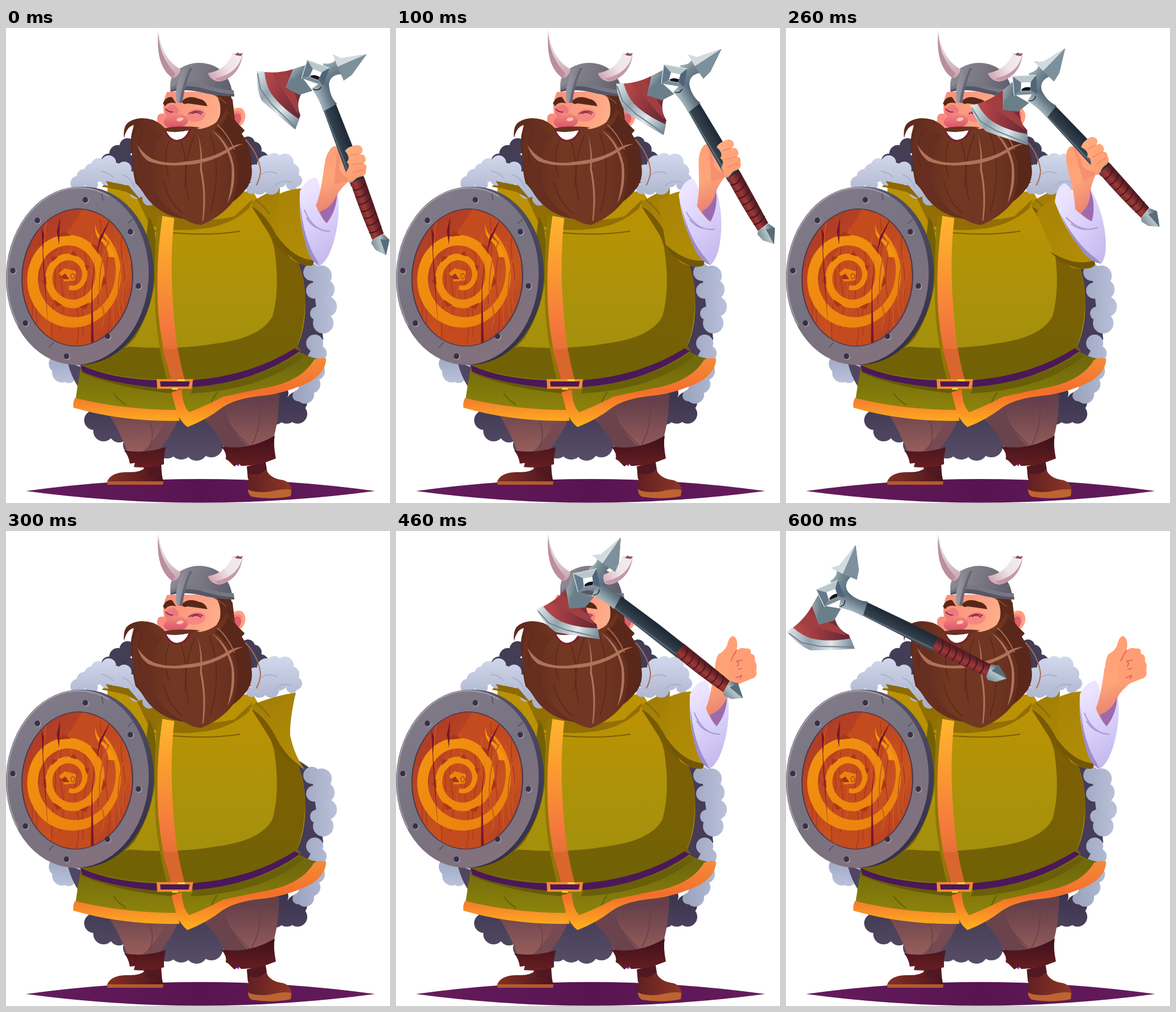
Recreate the animation shown at these times as an HTML page with a canvas. Size 673 by 832 pixels, loop 700 ms.

```html
<!DOCTYPE html>
<html lang="en">
<head>
<meta charset="utf-8">
<title>Axe throw</title>
<style>
html, body { margin: 0; width: 100%; height: 100%; overflow: hidden; background: #fff; }
canvas { display: block; width: 673px; height: 832px; }
</style>
</head>
<body>
<canvas id="stage" width="673" height="832"></canvas>
<script>
const ctx = document.getElementById('stage').getContext('2d');
const TAU = Math.PI * 2;
const STEP = 100;

// axe: centre x, y and turn in degrees; arm: turn about the elbow
const poses = [
  { axe: [649, 222, 0], arm: 0, grip: true },
  { axe: [616.5, 207.5, -9.6], arm: -9.5, grip: true },
  { axe: [572, 192, -22.4], arm: -22.4, grip: true },
  {},
  { axe: [501, 152, -31.8], arm: 0 },
  { axe: [353, 126, -43.2], arm: 0 },
  { axe: [254.5, 141.5, -43], arm: 0 }
];

function grad(x0, y0, x1, y1, ...colors) {
  const g = ctx.createLinearGradient(x0, y0, x1, y1);
  colors.forEach((c, i) => g.addColorStop(i / (colors.length - 1), c));
  return g;
}
function fill(d, color) {
  ctx.fillStyle = color;
  ctx.fill(new Path2D(d));
}
function line(d, color, width = 2) {
  ctx.strokeStyle = color;
  ctx.lineWidth = width;
  ctx.lineCap = 'round';
  ctx.stroke(new Path2D(d));
}
function oval(x, y, rx, ry, color, turn = 0) {
  ctx.fillStyle = color;
  ctx.beginPath();
  ctx.ellipse(x, y, rx, ry, turn, 0, TAU);
  ctx.fill();
}
// tufts given as x, y, radius; the space between their centres is filled too
function fur(color, ...n) {
  ctx.fillStyle = color;
  ctx.beginPath();
  for (let i = 0; i < n.length; i += 3) ctx.lineTo(n[i], n[i + 1]);
  ctx.fill();
  for (let i = 0; i < n.length; i += 3) oval(n[i], n[i + 1], n[i + 2], n[i + 2], color);
}

function drawCape() {
  fill('M35 811Q340 769 647 811Q340 852 35 811Z', grad(35, 0, 647, 0, '#651c5c', '#581451', '#651c5c'));
  const dark = grad(0, 640, 0, 757, '#3d3550', '#574d66');
  fur(dark, 165, 670, 20, 154, 687, 17, 171, 706, 18, 198, 709, 17, 222, 730, 17, 250, 728, 22,
    282, 733, 21, 307, 737, 19, 334, 739, 19, 360, 732, 20, 390, 715, 20, 470, 675, 20, 492, 675, 18,
    511, 676, 17, 510, 655, 18, 480, 640, 15);
  fill('M510 400L540 420L556 545L530 600L500 590Z', '#463c58');
  const light = grad(500, 0, 580, 0, '#98a0bb', '#bac1da');
  fur(light, 536, 428, 15, 553, 434, 18, 558, 458, 18, 562, 488, 18, 556, 517, 18, 545, 500, 12, 540, 460, 14);
  fur(light, 541, 552, 15, 548, 570, 14, 543, 601, 16, 535, 624, 16, 524, 642, 16, 512, 644, 10, 515, 600, 14);
  fur(grad(0, 585, 0, 625, '#a4adc9', '#bcc4dc'), 92, 588, 17, 98, 604, 17, 112, 600, 17, 110, 610, 12, 120, 590, 12);
  fill('M108 585L133 595L126 628Q114 610 108 585Z', '#504661');
}

function drawLegs() {
  const cloth = grad(0, 655, 0, 742, '#65404a', '#975e5b');
  fill('M180 676L186 660L308 665L302 684Q286 722 263 742L213 742Q200 708 180 676Z', cloth);
  fill('M280 685L302 684Q286 722 263 742L240 742Q270 712 280 685Z', '#764a50');
  line('M252 690Q261 710 252 735', '#65404a', 1.5);
  fill('M350 688L345 660L440 625L479 642Q478 690 467 725L385 741Q378 715 350 688Z', cloth);
  fill('M350 688L385 660Q384 700 430 738L385 741Q378 715 350 688Z', '#6b434c');
  line('M445 660Q448 700 430 731M381 680Q400 708 427 732', '#65404a', 1.5);
  const boot = grad(0, 715, 0, 775, '#3e101b', '#6b2022');
  fill('M243 760L272 764L274 795L238 795Z', '#501820');
  fill('M177 795Q184 777 215 778Q235 779 246 769L247 781Q260 786 272 778L276 796Z', grad(180, 0, 275, 0, '#823024', '#4b141f'));
  fill('M177 794L276 794L275 800L178 800Z', '#b35b31');
  fill('M207 740Q245 746 280 734Q276 752 277 764Q253 772 224 769L226 762L217 763Q215 749 207 740Z', boot);
  fill('M422 768L455 760L459 786L424 790Z', '#501820');
  fill('M427 780Q443 786 456 773Q462 789 486 792Q503 797 500 817Q462 827 426 817Q422 799 427 780Z', grad(425, 0, 500, 0, '#622022', '#8d3727'));
  fill('M424 808Q436 815 463 812Q488 806 500 809L499 820Q467 827 431 821Q424 817 424 808Z', '#bd6531');
  fill('M377 733Q425 741 471 714Q468 729 473 754Q440 768 412 767L408 763L400 768L390 758L385 755Q388 745 377 733Z', boot);
  fill('M403 762l7 -1l-3 7z', '#66128d');
}

function drawTunic() {
  fill('M132 590Q126 620 122 650Q200 669 301 672L315 690Q350 682 390 655Q440 638 490 631Q540 612 556 580Q537 580 513 567Z', grad(0, 590, 0, 675, '#716a0c', '#8f850b'));
  fill('M132 590Q220 628 298 626L301 641Q190 631 132 603Z', '#665b08');
  fill('M328 629Q450 616 514 570L522 575Q450 634 324 640Z', '#695f08');
  line('M370 638Q360 652 358 664M189 640Q195 650 210 660', '#665f0a', 2);
  const hem = grad(0, 580, 0, 695, '#f48a38', '#f36e2b', '#ffad1e');
  fill('M121 648Q205 669 302 669L304 688Q204 690 118 665Q117 655 121 648Z', grad(0, 648, 0, 690, '#f27b30', '#ffab1e'));
  fill('M290 638L308 633Q309 660 321 673Q352 661 380 646Q425 636 467 628Q520 615 540 581Q550 576 561 579Q561 603 532 620Q490 640 450 644Q405 648 380 664Q350 687 318 699Q305 689 299 672Z', hem);

  fill('M178 268L240 295L300 300L432 285L465 340Q518 398 523 455Q529 520 510 558L516 566Q441 614 300 616Q180 612 130 591L174 580Z', grad(0, 330, 0, 610, '#ba9204', '#ab920a', '#a18e0d'));
  fill('M430 314Q472 356 504 396Q525 428 524 483Q522 530 510 556L516 565Q452 613 320 617Q195 616 130 591L215 558Q300 565 372 552Q447 542 467 505Q481 455 470 385Q458 340 430 314Z', grad(0, 320, 0, 610, '#805e04', '#7b6004', '#716206'));
  fill('M168 278L178 268L240 295Q305 352 400 330L432 300L426 316Q390 348 340 352Q300 358 252 346L225 288Z', '#926e05');
  line('M251 354Q340 367 410 356', '#7b6004', 2);
  fill('M250 330Q267 350 262 430Q258 490 226 542Q205 568 160 595L140 592L230 500Z', '#756104');
  fill('M274 329L295 333Q286 410 294 500Q298 565 313 616L289 616Q272 555 267 500Q262 410 274 329Z', grad(0, 330, 0, 615, '#ffb52c', '#fa9931', '#f4793d', '#d9652e'));
  fill('M274 329Q261 420 267 500Q272 560 288 616L282 616Q263 545 261 480Q259 405 265 329Z', '#927706');
  fill('M274 560Q287 565 301 561Q306 590 313 616L289 616Z', '#d9662d');
  fill('M130 590Q184 615 266 617L266 630Q180 622 134 602ZM327 617Q430 609 506 561L515 566Q437 621 327 629Z', '#4b1858');
  fill('M264 615L328 615L325 632L265 632Z', '#f48931');
  fill('M270 619L322 619L320 628L271 628Z', '#4b1858');
  line('M302 617L312 617M292 632L300 632', '#ffe12a', 3);
}

function drawShoulder(armless) {
  const olive = grad(430, 290, 520, 415, '#a27c05', '#aa8606', '#b18d06');
  fill(armless
    ? 'M428 306Q470 288 508 283Q497 330 498 358Q506 395 524 418Q495 402 468 365Z'
    : 'M428 306Q468 282 480 280L478 350L525 410Q500 413 474 376Z', olive);
  fill('M430 312Q455 325 475 365Q493 398 519 413L503 407Q480 395 460 359Z', '#785a04');
  line('M438 301Q455 315 462 326', '#876606', 2);
}

function drawCollar() {
  fur('#443d56', 178, 240, 15, 180, 233, 13, 196, 220, 15, 213, 207, 14, 225, 240, 18);
  fur('#443d56', 424, 202, 12, 434, 213, 14, 446, 231, 15, 430, 260, 12);
  const light = grad(0, 220, 0, 305, '#d2d8ec', '#a9b1cb');
  fur(light, 126, 272, 13, 137, 260, 13, 151, 251, 14, 162, 241, 13, 180, 236, 13, 192, 248, 12, 207, 247, 13,
    220, 263, 12, 237, 282, 14, 251, 299, 12, 228, 287, 12, 199, 267, 11, 177, 264, 12, 150, 274, 11);
  fill('M175 268L182 280L211 287L236 301L215 276Z', '#8c6a05');
  fur(light, 437, 256, 17, 456, 239, 16, 470, 232, 13, 489, 235, 15, 500, 251, 14, 508, 267, 11, 501, 274, 10,
    480, 266, 13, 465, 278, 14, 444, 278, 14, 430, 282, 9);
  line('M167 251Q181 253 188 262M205 257Q220 263 225 279M448 256Q460 248 474 255M472 276Q484 265 500 270', '#a9b1cb', 2);
}

function turnArm(deg, draw) {
  ctx.save();
  ctx.translate(540, 406);
  ctx.rotate(deg * TAU / 360);
  ctx.translate(-540, -406);
  draw();
  ctx.restore();
}
const skin = () => grad(550, 200, 590, 330, '#ff9f75', '#ffa579', '#e1786e');

function drawSleeve() {
  fill('M478 291Q500 281 518 281Q513 350 540 414Q522 420 499 404L478 373Z', grad(480, 285, 535, 410, '#a98406', '#b28d06'));
  fill('M474 363Q505 406 541 407L537 416Q513 421 483 384Z', '#735706');
  fill('M515 286Q527 263 543 262Q552 273 550 290L580 276Q588 326 575 372Q565 408 549 417Q535 406 526 379Q513 339 515 286Z', grad(515, 290, 580, 390, '#ece5ff', '#d9d0fb', '#c6bbed'));
  fill('M516 305Q520 368 545 407L549 417Q531 408 524 374Q516 345 516 305Z', '#9d8dca');
  line('M523 319Q538 356 567 356M527 333Q535 347 547 351', '#a99ad4', 2);
}
function drawForearm() {
  fill('M558 240L606 264Q586 280 580 293Q579 320 562 342Q553 334 543 311Q552 289 558 240Z', skin());
  fill('M580 291Q580 318 562 342Q555 335 550 322Q572 314 580 291Z', '#9c6bad');
}
function drawPalm() {
  fill('M559 249Q556 231 567 214Q574 204 581 208L609 222L606 267L570 280Z', skin());
  fill('M581 208Q588 224 584 248Q596 267 607 262L606 267L575 274Z', '#f4916f');
}
function drawFingers() {
  fill('M594 215Q600 207 615 205Q623 205 625 213Q625 220 618 222Q628 219 630 228Q632 234 626 237Q634 239 631 248Q632 257 624 260Q615 261 610 267Q604 272 600 270L596 252Q605 241 597 235Q605 228 594 215Z', grad(595, 210, 630, 265, '#ffad80', '#ff996f'));
  line('M604 223L618 221M606 239L626 237M608 253L626 249', '#e9896d', 1.5);
}
function drawThumbsUp() {
  fill('M559 251Q558 228 565 216Q575 211 580 201Q584 184 591 184Q601 189 597 209Q604 203 613 206Q623 204 622 215Q631 217 629 228Q634 236 631 244Q634 255 625 258Q604 262 594 275L575 286Z', skin());
  fill('M588 217Q602 204 613 206Q623 204 622 215Q631 217 629 228Q634 236 631 244Q634 255 625 258L586 274Q579 245 588 217Z', '#ff9e75');
  line('M587 227Q591 217 597 209M597 228L607 226M600 242L606 241M596 257L606 253M597 228Q603 231 598 237M606 253L603 259', '#d95c66', 1.6);
}

function drawHead() {
  fill('M350 100L393 114Q400 139 401 167L418 180L390 210L360 160Z', '#5c2a1a');
  oval(405, 157, 14, 18, '#ffa083', 0.35);
  oval(404, 160, 8, 11, '#de5e6d', 0.35);
  line('M397 151Q406 143 413 151', '#f98474', 3);
  fill('M282 112L363 111Q379 127 375 153Q365 181 334 178L278 176Q264 173 265 158Q268 149 277 150Q273 132 282 112Z', grad(275, 130, 375, 170, '#f98f7a', '#ffb08b'));
  oval(333, 153, 17, 11, '#f5897f', -0.2);
  oval(272, 158, 7, 8, '#f98d7e');
  fill('M278 146Q283 133 296 135L303 143L301 155L283 157Z', '#ec7a7c');
  fill('M276 166Q279 152 297 149Q316 149 319 162Q318 173 298 175Q280 177 276 166Z', grad(0, 149, 0, 176, '#f98a7b', '#d6506c'));
  oval(305, 160, 6, 3, '#ffc6b1', -0.2);
  line('M280 142Q286 148 292 147M321 150Q333 142 344 148M326 150Q334 145 342 151', '#8c2c4c', 2);
  fill('M275 132Q281 119 291 121L298 132Q285 128 279 137ZM308 129Q318 116 338 124Q350 126 353 137Q334 134 318 132Q311 135 308 129Z', '#572717');
  fill('M352 110Q382 111 397 125L401 159Q388 157 390 141Q378 116 352 110Z', '#5c2a1a');
  line('M356 113Q373 120 386 132', '#8b5038', 1.5);

  const hair = grad(220, 0, 435, 0, '#5f2a1c', '#733822', '#703622', '#5c281a');
  fill('M207 193Q204 170 218 163Q235 154 258 161Q270 166 280 177Q312 170 340 177Q374 171 386 142L401 160Q409 173 418 179L412 183Q429 211 429 241Q434 261 423 279Q410 296 398 304Q377 331 342 345Q327 344 311 334Q265 325 244 294Q235 279 227 272Q221 249 222 224Q216 212 220 186L224 170Q211 173 207 193Z', hair);
  fill('M276 187Q250 207 256 269Q268 315 316 335Q269 330 245 293Q226 265 222 230Q220 192 230 173Z', '#662f20');
  fill('M389 150L418 179L410 182Q432 207 430 240Q434 264 421 281L397 304Q411 265 405 232Q393 197 365 177Q382 172 389 150Z', '#5a281b');
  line('M286 198Q274 225 285 261M307 200Q319 234 313 278M330 188Q307 245 320 300M357 184Q380 247 358 323M239 180Q227 209 235 240M277 270Q285 305 309 324', '#5c281a', 1.6);
  fill('M230 204Q240 221 258 230Q285 240 314 234Q360 230 390 210Q404 203 416 203Q402 207 389 217Q355 238 313 240Q274 243 249 233Q235 223 230 204Z', '#b0735a');
  fill('M336 186Q346 216 343 246Q353 291 346 337L344 338Q349 287 340 248Q343 214 336 186ZM360 179Q390 197 399 239Q404 278 388 307Q398 270 395 239Q386 201 360 179Z', '#b0735a');
  line('M371 170Q388 185 400 212M420 196Q442 219 446 249Q446 262 439 275', '#a86b52', 2);
  fill('M277 178Q300 184 325 176Q320 198 299 199Q283 198 277 178Z', '#782131');
  fill('M281 181Q302 184 320 179Q314 195 299 196Q288 195 281 181Z', '#fff');
  fill('M272 177Q298 170 340 174Q322 181 300 181Q284 182 272 177Z', '#6a3120');
  drawHelmet();
}

function drawHelmet() {
  fill('M288 106Q286 80 306 70Q332 55 361 65Q389 76 396 109L399 115Q369 112 344 104Q318 98 288 106Z', grad(290, 70, 398, 108, '#8f8c96', '#777681', '#5c5b69'));
  fill('M288 104Q315 88 347 99Q377 109 399 109L400 118Q364 117 337 108Q312 102 288 111Z', '#777783');
  fill('M288 109Q314 98 338 104Q374 115 400 116L400 120Q365 119 340 112Q311 106 289 112Z', '#565666');
  fill('M308 73Q317 67 327 70Q313 93 309 131L301 131Q296 126 299 104Z', grad(298, 0, 327, 0, '#9b9aa3', '#747380'));
  fill('M322 71L327 70Q314 94 309 131L304 131Q308 100 322 71Z', '#666574');
  fill('M266 0C264 38 270 69 292 88Q304 85 306 72C285 61 271 39 266 0Z', grad(0, 0, 0, 88, '#f4eeef', '#ded2db', '#caa1ad'));
  fill('M267 9Q269 51 297 80L292 88C270 72 264 43 267 9Z', '#ba8e9e');
  fill('M354 79C374 76 391 63 397 44L402 46L406 43L410 45L415 44C413 67 399 90 373 94Q357 91 354 79Z', grad(355, 85, 415, 45, '#d1a4b1', '#efe4e8', '#f4edf0'));
  fill('M415 44C410 70 391 84 366 88L373 94C400 89 413 67 415 44Z', '#c598a8');
  fill('M397 44L402 46L406 43L410 45L415 44L412 49L404 48Z', '#8d536c');
}

// snake coil: a tapering band wound inwards
function drawCoil() {
  const at = (u, off) => {
    const a = -0.92 + u * TAU * 2.42;
    const r = 91 - 73 * Math.pow(u, 0.82) + off;
    return [113 + r * Math.cos(a), 435 + r * 1.08 * Math.sin(a)];
  };
  const width = u => 2 + 9.5 * Math.min(1, u * 5) * (1 - u * 0.82);
  ctx.fillStyle = grad(50, 350, 190, 520, '#f39410', '#ea800e');
  ctx.beginPath();
  for (let i = 0; i <= 120; i++) ctx.lineTo(...at(i / 120, width(i / 120)));
  for (let i = 120; i >= 0; i--) ctx.lineTo(...at(i / 120, -width(i / 120)));
  ctx.fill();
  ctx.fillStyle = '#a83718';
  for (let i = 0; i < 9; i++) {
    const u = 0.36 + i * 0.062, w = width(u);
    ctx.beginPath();
    ctx.lineTo(...at(u - 0.012, w - 1));
    ctx.lineTo(...at(u, w + 6));
    ctx.lineTo(...at(u + 0.012, w - 1));
    ctx.fill();
  }
  fill('M157 342Q156 360 175 373Q187 385 193 402L180 401Q178 381 164 371Q154 361 157 342Z', '#f39410');
  fill('M93 429L103 421L123 426L121 442L102 444Z', '#ec850e');
  fill('M96 435L104 430L111 440L100 440Z', '#a53218');
  line('M117 430Q121 431 120 437Q116 442 114 437Q113 431 117 430', '#b44717', 1.3);
}

function drawShield() {
  oval(134, 434, 125, 156, grad(140, 280, 250, 550, '#57546a', '#33304a'), 0.06);
  oval(125, 434, 125, 156, grad(30, 300, 220, 570, '#817b89', '#777280', '#85717d'), 0.06);
  ctx.strokeStyle = '#a29ca7';
  ctx.lineWidth = 2;
  ctx.beginPath();
  ctx.ellipse(125, 434, 123, 154, 0.06, 2.5, 5.1);
  ctx.stroke();
  oval(125, 437, 98, 121, '#49384d', 0.06);
  ctx.save();
  ctx.beginPath();
  ctx.ellipse(125, 437, 96, 119.5, 0.06, 0, TAU);
  ctx.clip();
  ctx.fillStyle = grad(30, 330, 220, 540, '#a83828', '#bb4522', '#ca521f', '#b23c22');
  ctx.fillRect(25, 310, 205, 255);
  fill('M134 317L182 334L148 449L151 560L80 560L71 420Z', '#c44b1e');
  for (let i = 0; i < 15; i++) {
    const x = 30 + i * 13.5, y = 330 + (i * 67) % 95;
    line(`M${x} ${y}q${i % 2 ? -7 : 6} 38 0 70t-3 78`, i % 3 ? '#ad381f' : '#d3561d', 1.6);
  }
  drawCoil();
  line('M180 374Q159 420 165 480Q177 500 167 526M205 405Q191 454 200 505M218 410Q203 458 205 493', '#c25a22', 2);
  fill('M62 350L67 361L65 390L74 525L66 430ZM184 332L166 373L159 397L164 366ZM156 400L151 460L154 556L149 552L150 454ZM95 331L93 380L89 356Z', '#761829');
  ctx.restore();
  const studs = [139, 301, 55, 337, 218, 357, 12, 425, 232, 452, 34, 517, 178, 540, 106, 575];
  for (let i = 0; i < studs.length; i += 2) {
    oval(studs[i] + 1, studs[i + 1] + 1, 5.5, 5.5, '#a19aa8');
    oval(studs[i], studs[i + 1], 4.7, 5, '#373046');
  }
  line('M168 290L170 302M76 559L83 551M214 342L222 335', '#514b5d', 1.5);
}

function drawAxe([x, y, deg]) {
  ctx.save();
  ctx.translate(x, y);
  ctx.rotate(deg * TAU / 360);
  ctx.translate(-649, -222);
  fill('M444 76Q475 81 503 72L522 108Q506 130 516 153L510 168Q464 145 444 76Z', grad(445, 90, 520, 130, '#bd4c4b', '#96383f', '#692a37'));
  fill('M467 79L491 77L512 130L512 151Z', '#a03e41');
  fill('M440 75L453 77Q455 99 465 115Q482 139 514 160L507 178Q472 149 448 127Q438 105 440 75Z', grad(440, 80, 510, 170, '#dce5e8', '#92a3ad', '#e0e7e9', '#778b98'));
  line('M441 80L446 107L465 133L506 173', '#71838f', 2);

  fill('M554 138L577 130L609 211L629 266L605 278L581 212Z', grad(565, 180, 590, 171, '#455461', '#303d49', '#202c38'));
  line('M557 142L608 273', '#5e6e79', 2);
  fill('M604 272L628 262Q645 310 662 360L642 371Q621 324 604 272Z', grad(617, 320, 641, 311, '#602126', '#9d3937', '#591d25'));
  for (let i = 0; i < 7; i++) line(`M${609 + i * 4.7} ${284 + i * 12.4}q12 1 20 -11`, '#431821', 2);
  fill('M642 371L662 361L672 371L666 398L648 389L640 377Z', grad(642, 380, 672, 373, '#7c929c', '#b5c3c9', '#465c6a'));
  fill('M656 370L672 371L666 398Z', '#576d79');

  // collar, socket and spike around the square ring
  fill('M490 104L503 72L528 64L520 88L537 110L514 117Z', grad(490, 75, 530, 112, '#aebdc4', '#60737f', '#8497a2'));
  fill('M490 104L500 88L520 88L537 110L514 117Z', '#6b7f8b');
  fill('M536 106L556 92L566 86Q564 117 580 133L556 146Q549 124 536 106Z', grad(545, 115, 573, 105, '#a3b3bb', '#6d818e', '#425664'));
  fill('M556 62Q573 64 577 56L573 46L587 53L632 46L606 82L592 92L587 81Q567 82 566 100L554 97Z', grad(565, 50, 590, 90, '#b4c3ca', '#71868f', '#51667a'));
  fill('M573 46L587 53L632 46L581 68Z', '#d2dce0');
  fill('M632 46L581 68L587 81L592 92L606 82Z', '#7d919d');
  fill('M528 56L567 70L553 78L538 72Z', '#b9c7cd');
  fill('M567 70L556 101L547 91L553 78Z', '#50657a');
  fill('M556 101L518 88L532 85L547 91Z', '#7b8f9b');
  fill('M518 88L528 56L538 72L532 85Z', '#64798a');
  line('M518 88L528 56L567 70M532 85L547 91L553 78', '#dae3e6', 1.3);
  fill('M538 72L553 78L547 91L532 85Z', '#fff');
  fill('M533 84Q540 80 550 86L547 91L534 86Z', '#11161a');
  line('M539 107Q547 111 552 104', '#182126', 1.4);
  ctx.restore();
}

function draw({ axe, arm, grip }) {
  ctx.clearRect(0, 0, 673, 832);
  drawCape();
  drawLegs();
  drawTunic();
  drawShoulder(!axe);
  drawCollar();
  if (axe) turnArm(arm, () => {
    drawSleeve();
    drawForearm();
    grip ? drawPalm() : drawThumbsUp();
  });
  drawHead();
  drawShield();
  if (axe) drawAxe(axe);
  if (grip) turnArm(arm, drawFingers);
}

const start = performance.now();
let shown = -1;
function tick() {
  const i = Math.floor((performance.now() - start) / STEP) % poses.length;
  if (i !== shown) draw(poses[shown = i]);
  requestAnimationFrame(tick);
}
tick();
</script>
</body>
</html>
```
